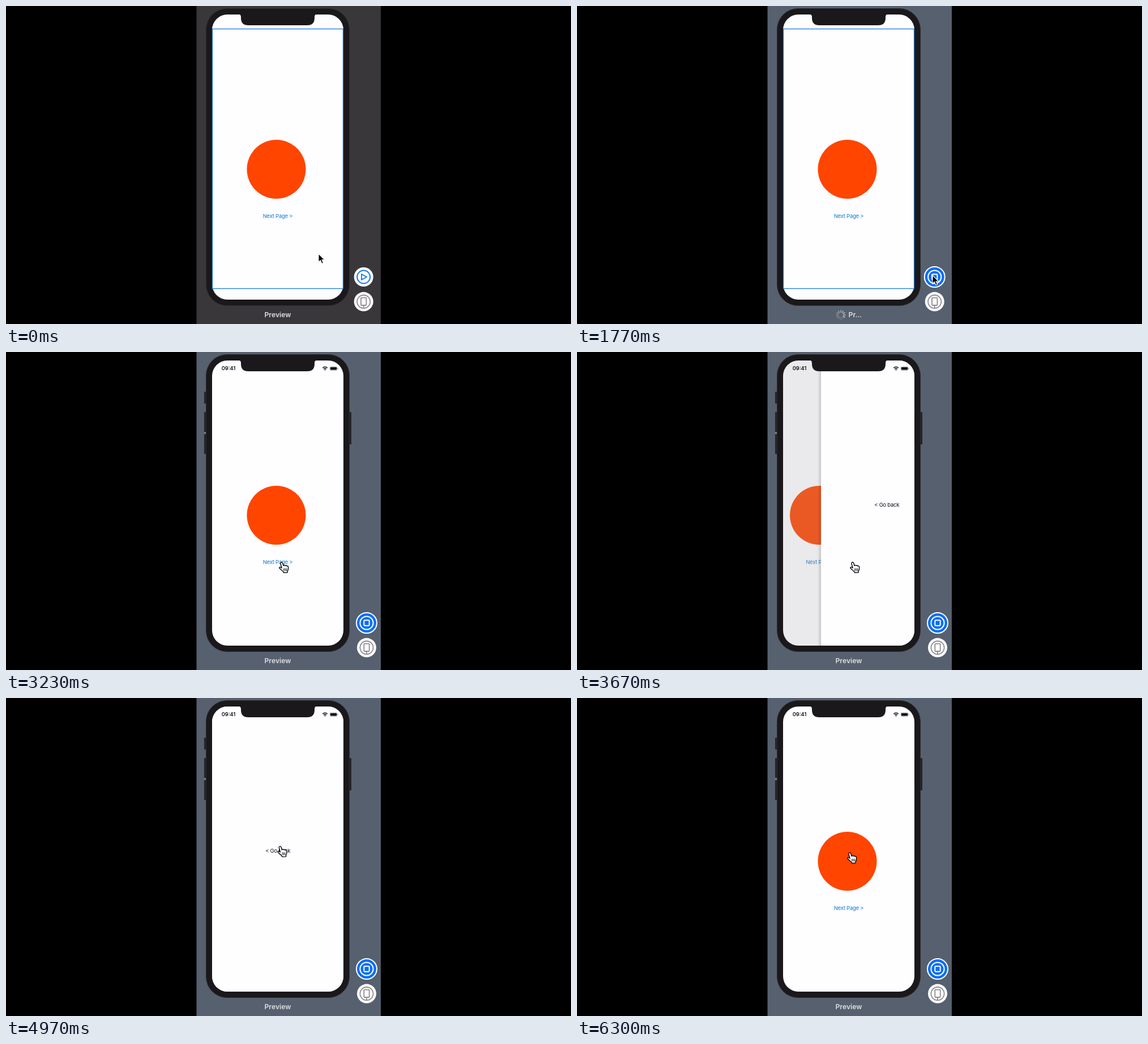
An HTML page that plays this animation: 998 by 561 pixels, repeating every 6330 ms.

```html
<!DOCTYPE html>
<html lang="en">
<head>
<meta charset="utf-8">
<title>Preview</title>
<style>
  html, body { margin: 0; width: 100%; height: 100%; overflow: hidden; background: #000; }
  svg { display: block; width: 100%; height: 100%; }
  text { font-family: Inter, Roboto, sans-serif; }
  .body { font-size: 9.5px; letter-spacing: -.25px; text-anchor: middle; }
  .title { font-size: 12.2px; font-weight: 600; fill: #dfdfe1; }
</style>
</head>
<body>
<svg viewBox="0 0 998 561">
  <defs>
    <clipPath id="screen"><rect x="364" y="15" width="232" height="503" rx="27"/></clipPath>
    <linearGradient id="edge">
      <stop offset="0" stop-color="#000" stop-opacity="0"/>
      <stop offset="1" stop-color="#000" stop-opacity=".16"/>
    </linearGradient>
  </defs>

  <rect id="panel" x="336.5" width="325.5" height="561"/>

  <g id="sideKeys" fill="#232329">
    <circle cx="351.5" cy="142.5" r="1.6" fill="#85878c"/>
    <rect x="350" y="70" width="5" height="21" rx="1"/>
    <rect x="350" y="106" width="5" height="35" rx="1"/>
    <rect x="350" y="145" width="5" height="35" rx="1"/>
    <rect x="605" y="106" width="5" height="57" rx="1"/>
  </g>
  <rect x="353.5" y="4.5" width="253" height="524" rx="37" fill="#1a181a" stroke="#2c2b2e"/>

  <g clip-path="url(#screen)">
    <g id="home">
      <rect x="364" y="15" width="310" height="503" fill="#fefdff"/>
      <g id="link">
        <circle cx="477.5" cy="288" r="52" fill="#ff4500"/>
        <text class="body" x="480" y="373.7" fill="#127bcb">Next Page &gt;</text>
      </g>
    </g>
    <rect id="dim" x="364" y="15" width="232" height="503"/>
    <g id="detail">
      <rect x="358" y="15" width="6" height="503" fill="url(#edge)"/>
      <rect x="364" y="15" width="232" height="503" fill="#fefdff"/>
      <text class="body" x="480.2" y="273" fill="#111">&lt; Go back</text>
    </g>
  </g>
  <path d="M411 14.5 Q415 15 415 19 V21 Q415 34 428 34 H532 Q545 34 545 21 V19 Q545 15 549 14.5Z" fill="#1a181a"/>

  <rect id="outline" x="364.5" y="40.5" width="231" height="458" fill="none" stroke="#1d7bdb" stroke-width="1.3"/>

  <g id="status" fill="#111">
    <text x="393" y="32.3" font-size="9.2" font-weight="600" text-anchor="middle">09:41</text>
    <g fill="none" stroke="#111" stroke-width="1.5">
      <path d="M559.2 28 Q563.5 24.4 567.8 28"/>
      <path d="M561 30 Q563.5 28 566 30"/>
    </g>
    <circle cx="563.5" cy="31.6" r="1"/>
    <rect x="572" y="26" width="13" height="6.4" rx="1.8" fill="none" stroke="#888" stroke-width=".6"/>
    <rect x="572.8" y="26.8" width="11.4" height="4.8" rx="1.1"/>
    <path d="M586 28 v2.4" stroke="#888"/>
  </g>

  <g id="tools">
    <g id="play" fill="none" stroke="#1a7be2" stroke-width="2">
      <circle cy="478" r="17" fill="#fff" stroke="none"/>
      <circle cy="478" r="11.5"/>
      <path d="M-3.6 473 L5.4 478 L-3.6 483Z" stroke-linejoin="round"/>
    </g>
    <g id="stop" fill="none" stroke="#fff" stroke-width="2">
      <circle cy="478" r="18" fill="#0a6ff5"/>
      <circle cy="478" r="11.6"/>
      <rect x="-4.7" y="473.3" width="9.4" height="9.4" rx="1.4"/>
    </g>
    <g fill="none" stroke="#8d8c92" stroke-width="1.8">
      <circle cy="521.6" r="17" fill="#fff" stroke="none"/>
      <circle cy="521.6" r="11.6"/>
      <rect x="-4.7" y="514.6" width="9.4" height="13.4" rx="1.2" fill="#fff"/>
      <path d="M0 528 V533"/>
    </g>
  </g>

  <text id="label" class="title" x="480" y="549.3" text-anchor="middle">Preview</text>
  <g id="busy">
    <text class="title" x="479.6" y="549.3">Pr...</text>
    <g id="spinner" stroke="#d8dade" stroke-width="1.5" stroke-linecap="round"></g>
  </g>

  <path id="arrow" d="M0 0 V15 L3.5 11.8 L5.9 17.4 L8.5 16.3 L6.1 10.8 H10.8Z" fill="#000" stroke="#fff" stroke-width="1.1"/>
  <g id="hand" stroke="#000" stroke-linecap="round" stroke-linejoin="round">
    <path transform="translate(-4.5 -1)" stroke-width="1.4" fill="#fff"
      d="M3.5 1.5 C4.5 .2 6.2 .8 6.6 2.2 L8 7 C9 5.6 10.6 6 11 7 C12 6 13.5 6.5 13.8 7.6 C15 7 16.5 7.8 16.6 9.5 C16.8 12 16.8 14 15.2 16.5 L15 19 L8.5 19.3 L7.6 17.5 C5.5 15 3 13.8 1 11.2 C.3 9.8 1.8 8.8 3.4 9.8 L5 11 L3 3.6 C2.8 2.8 2.9 2 3.5 1.5Z"/>
    <path d="M4.3 11 v4 M6.6 11 v4 M8.9 11 v4" stroke-width="1"/>
  </g>
</svg>
<script>
const LOOP = 6330, WIDTH = 232;
const START = 670, LIVE = 1870, READY = 2000;
const PUSH = 3493, PUSHED = 4050, POP = 5562, POPPED = 6110;

const el = {};
document.querySelectorAll('svg [id]').forEach(n => el[n.id] = n);

const clamp = v => Math.max(0, Math.min(1, v));
const span = (t, a, b) => clamp((t - a) / (b - a));
const mix = (a, b, k) => a + (b - a) * k;
const move = (node, x, y = 0) => node.setAttribute('transform', `translate(${x} ${y})`);
const show = (node, on) => node.setAttribute('display', on ? 'inline' : 'none');

const linear = k => k;
const easeOut = k => 1 - (1 - k) ** 2;
const easeInOut = k => k * k * (3 - 2 * k);

// Pointer stops: time, x, y, easing towards the stop
const stops = [
  [30, 552, 437, linear],
  [600, 628, 475, easeInOut],
  [2530, 628, 475, linear],
  [2630, 579, 434, linear],
  [3130, 486.5, 370, easeOut],
  [3230, 486.5, 371, linear],
  [3700, 486.5, 371, linear],
  [3800, 486.5, 369.3, linear],
  [4230, 486.5, 369.3, linear],
  [4830, 484, 261, easeInOut],
  [4870, 484, 261, linear],
  [5500, 482, 273, easeInOut],
  [6230, 482, 273, linear],
  [6300, 481.5, 273, linear]
];

function pointer(t) {
  const i = stops.findIndex(s => t < s[0]);
  if (i === 0) return stops[0].slice(1, 3);
  if (i < 0) return stops[stops.length - 1].slice(1, 3);
  const a = stops[i - 1], b = stops[i], k = b[3](span(t, a[0], b[0]));
  return [mix(a[1], b[1], k), mix(a[2], b[2], k)];
}

// Critically damped spring, 0 to 1
function spring(ms) {
  const u = Math.max(0, ms) * .014;
  return 1 - (1 + u) * Math.exp(-u);
}

// Share of the screen covered by the detail page
function cover(t) {
  if (t < PUSH || t >= POPPED) return 0;
  if (t < PUSHED) return spring(t - PUSH);
  return 1 - spring(t - POP);
}

for (let i = 0; i < 12; i++) {
  const spoke = document.createElementNS('http://www.w3.org/2000/svg', 'path');
  spoke.setAttribute('d', 'M0 -4.6 V-8');
  spoke.setAttribute('transform', `translate(466 545) rotate(${i * 30})`);
  el.spinner.append(spoke);
}

function draw(t) {
  const started = t >= START, live = t >= LIVE;
  const tint = span(t, START, 1000);
  const from = [57, 55, 58], to = [86, 96, 111];
  el.panel.setAttribute('fill', `rgb(${from.map((c, i) => Math.round(mix(c, to[i], tint)))})`);

  show(el.play, !started);
  show(el.stop, started);
  show(el.sideKeys, live);
  show(el.status, live);
  show(el.outline, !live);
  move(el.tools, live ? 637 : 631.7);

  const busy = t >= 900 && t < READY;
  show(el.busy, busy);
  show(el.label, !busy);
  // The spinner stalls while the build blocks
  const turn = Math.floor((Math.min(t, 1200) + Math.max(0, t - 1630)) / 83);
  [...el.spinner.children].forEach((s, i) =>
    s.setAttribute('opacity', mix(.9, .2, ((turn - i) % 12 + 12) % 12 / 11)));

  const p = cover(t);
  show(el.detail, p > 0);
  move(el.detail, WIDTH * (1 - p));
  move(el.home, -.3 * WIDTH * p);
  el.dim.setAttribute('opacity', .11 * p);
  const pressed = t >= 3500 && t < 3750;
  el.link.setAttribute('opacity', pressed ? mix(.5, 1, span(t, 3500, 3750)) : 1);

  const [x, y] = pointer(t), over = live && x < 607;
  show(el.arrow, !over);
  show(el.hand, over);
  move(over ? el.hand : el.arrow, x, y);
}

const t0 = performance.now();
function tick(now) {
  draw(Math.max(0, now - t0) % LOOP);
  requestAnimationFrame(tick);
}
draw(0);
requestAnimationFrame(tick);
</script>
</body>
</html>
```
